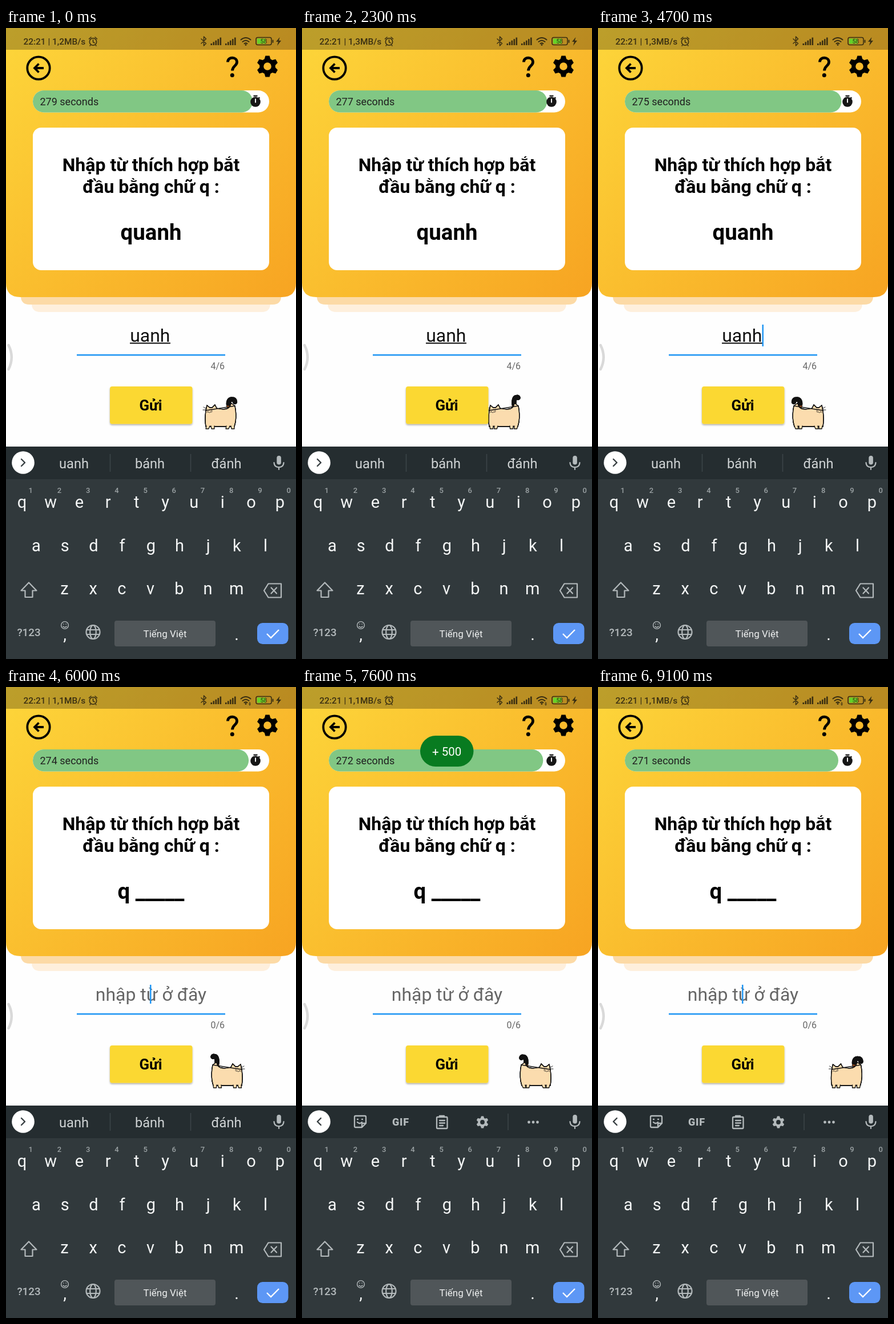
Recreate the animation shown at these times as an HTML page. Size 508x1102 px, loop 9200 ms.

```html
<!DOCTYPE html>
<html lang="vi">
<head>
<meta charset="utf-8">
<style>
html, body { margin: 0; width: 100%; height: 100%; overflow: hidden; background: #fefefe; }
svg { display: block; width: 100%; height: 100%; }
text { font-family: Roboto, "Noto Sans", sans-serif; }
.mid { text-anchor: middle; }
.bold { font-weight: 700; }
.line { fill: none; stroke: currentColor; stroke-linecap: round; stroke-linejoin: round; }
.ink { color: #3a2f12; fill: #3a2f12; }
.pale { color: #b4babc; fill: #b4babc; }
</style>
</head>
<body>
<svg viewBox="0 0 508 1102" preserveAspectRatio="none">
  <defs>
    <linearGradient id="sun" gradientUnits="userSpaceOnUse" x1="0" y1="0" x2="508" y2="470">
      <stop stop-color="#fdd63a"/><stop offset="1" stop-color="#f7a422"/>
    </linearGradient>
    <filter id="soft" x="-10%" y="-10%" width="120%" height="130%">
      <feDropShadow dx="0" dy="2" stdDeviation="1.6" flood-opacity=".32"/>
    </filter>
    <g id="gear">
      <circle r="10.3" fill="none" stroke="currentColor" stroke-width="7"/>
      <path id="tooth" d="M-5.5 -12 L-3.6 -18.6 H3.6 L5.5 -12 Z" fill="currentColor"/>
      <use href="#tooth" transform="rotate(60)"/><use href="#tooth" transform="rotate(120)"/>
      <use href="#tooth" transform="rotate(180)"/><use href="#tooth" transform="rotate(240)"/>
      <use href="#tooth" transform="rotate(300)"/>
    </g>
    <clipPath id="coat"><use href="#body"/></clipPath>
  </defs>

  <rect width="508" height="1102" fill="#fefefe"/>
  <path d="M45 480H463V481Q463 496 448 496H60Q45 496 45 481Z" fill="#feefdc"/>
  <path d="M26 460H482V468Q482 483 467 483H41Q26 483 26 468Z" fill="#fcdaa6"/>
  <path d="M0 0H508V445Q508 470 483 470H25Q0 470 0 445Z" fill="url(#sun)"/>
  <rect width="508" height="38" opacity=".26"/>

  <!-- status bar -->
  <g class="ink">
    <text id="speed" x="30.5" y="29" font-size="15.4" font-weight="500"></text>
    <g class="line" stroke-width="1.6">
      <circle cx="152.500" cy="24" r="6.200"/><path d="M152.500 20.500V24.500L155 26M145.500 19L149 16M159.500 19L156 16M148 30L147 31M157 30L158 31"/>
      <path d="M342 19L350.500 27L346.500 31V15L350.500 19L342 27" stroke-width="1.5"/>
      <path d="M411.500 20.500Q420 13.500 428.500 20.500M414.500 24Q420 19.500 425.500 24M417.500 27.300Q420 25.400 422.500 27.300" stroke-width="2"/>
      <rect x="438" y="16.500" width="27" height="13" rx="3"/>
      <path d="M467.500 21.500V25" stroke-width="2"/>
    </g>
    <circle cx="420" cy="29.500" r="1.400"/>
    <path id="traffic" d="M425 29L427 26.500L429 29ZM425 30H429L427 32.500Z"/>
    <g id="bars"></g>
    <rect x="440" y="18.500" width="15" height="9" fill="#66d228"/>
    <text x="451.500" y="27" font-size="10.500" class="mid">58</text>
    <path d="M479.500 16L473 24H476.800L475 31L482 22H478Z"/>
  </g>

  <!-- header icons -->
  <g color="#000">
    <circle cx="57" cy="70" r="19.700" class="line" stroke-width="3.800"/>
    <path d="M66 70H51M57.500 62.500L50 70L57.500 77.500" class="line" stroke-width="3.800" style="stroke-linecap:butt;stroke-linejoin:miter"/>
    <path d="M388.500 59.500C388.500 49.500 404.500 50 404.500 59.500C404.500 66 396.500 66.500 396.500 74.500" class="line" stroke-width="4.800" style="stroke-linecap:butt"/>
    <circle cx="396.300" cy="82.500" r="3.500"/>
    <use href="#gear" x="458" y="67"/>
  </g>

  <!-- timer -->
  <rect x="47" y="109" width="414" height="38.500" rx="19.200" fill="#fff"/>
  <rect id="bar" x="47" y="109" height="38.500" rx="19.200" fill="#81c784"/>
  <text id="left" x="59.500" y="135" font-size="18" fill="#202020"></text>
  <g fill="#161616">
    <circle cx="437" cy="129" r="8.800"/><rect x="433.500" y="117.500" width="7" height="2.200"/>
    <path d="M442.500 121L444.500 123" stroke="#161616" stroke-width="2"/>
    <rect x="436.100" y="123.500" width="1.900" height="7" fill="#fff"/>
  </g>

  <!-- question card -->
  <rect x="47" y="174" width="414" height="249" rx="14.500" fill="#fff"/>
  <g class="mid bold">
    <text x="254" y="250" font-size="32">Nhập từ thích hợp bắt</text>
    <text x="254" y="287.500" font-size="32">đầu bằng chữ q :</text>
    <text id="word" x="254" y="370" font-size="38.400"></text>
  </g>

  <g id="toast">
    <rect x="207" y="85" width="93.500" height="54" rx="27" fill="#087b20"/>
    <text x="253.700" y="120" font-size="20.500" fill="#fff" class="mid">+ 500</text>
  </g>

  <!-- answer field -->
  <path d="M4.500 554Q15 575 4.500 596" class="line" color="#d9d9d9" stroke-width="4.500"/>
  <text id="field" x="254" y="548" font-size="32" class="mid"></text>
  <rect id="under" x="217" y="549.500" width="71" height="1.900"/>
  <rect id="caret" width="2.500" fill="#2196f3"/>
  <rect x="124" y="569.800" width="260" height="2.600" fill="#2196f3"/>
  <text id="count" x="383" y="596" font-size="16" text-anchor="end" fill="#666"></text>

  <!-- cat -->
  <g id="cat" stroke="#111" stroke-width="1.300" stroke-linejoin="round" stroke-linecap="round">
    <g fill="none">
      <path class="tail" stroke-width="8.500"/>
      <path class="tail" stroke="#f4711f" stroke-width="6.300"/>
      <path class="tail" stroke-width="8.500" pathLength="100" stroke-dasharray="0 52 60"/>
    </g>
    <path id="body" d="M2 28L4 19L9 23H13L18 18L21 24Q31 27 39 25Q45 23 46 15L53 20Q56 35 54 48L52 56H2Q0 44 2 28Z" fill="#fbdcae"/>
    <g clip-path="url(#coat)" stroke="none">
      <path d="M8 20L18 16L24 24L46 14L58 18L56 38Q49 34 47 43Q41 47 36 39Q29 43 25 33Q15 32 8 20Z" fill="#f98a1b"/>
      <path d="M43 15H58V36Q49 35 43 15Z" fill="#ef6a22"/>
      <path d="M12 24L18 15L23 25Q20 28 12 24ZM26 23H36Q34 31 29 29ZM37 35Q42 30 44 37Q41 42 37 35Z" fill="#17110e"/>
    </g>
    <use href="#body" style="fill:none"/>
    <path d="M2 28L4 19L9 23H13L18 18L21 24Q31 27 39 25Q45 23 46 15M53 20Q56 35 54 48L52 56H2Q0 44 2 28Z" fill="none"/>
    <g id="legs" fill="#fbdcae"></g>
    <path d="M-2 22L3 25M-3 27H3M9 26L13 28M9 31L13 30M5 27L6 28M4 31L6 30L8 32" fill="none" stroke-width=".9"/>
  </g>

  <rect x="182" y="626" width="144.500" height="65.500" rx="4" fill="#fbd831" filter="url(#soft)"/>
  <text x="253.500" y="668" font-size="25.800" class="mid bold">Gửi</text>

  <!-- keyboard -->
  <rect y="731" width="508" height="371" fill="#31393c"/>
  <rect y="731" width="508" height="57" fill="#252d30"/>
  <circle cx="30" cy="759" r="19.800" fill="#fff"/>
  <path id="arrow" class="line" color="#3b4245" stroke-width="2.400"/>
  <g id="hints" fill="#d0d4d5" font-size="23.600" class="mid">
    <text x="119" y="769">uanh</text><text x="252" y="769">bánh</text><text x="386" y="769">đánh</text>
    <path d="M182.500 744V775M323.500 744V775" stroke="#3d4649" stroke-width="1.500"/>
  </g>
  <g id="tools" class="pale">
    <g class="line" stroke-width="2.300">
      <path d="M94 749H110Q112 749 112 751V762L105 769H94Q92 769 92 767V751Q92 749 94 749M112 762H105V769"/>
      <path d="M97 755H98M105 755H106M97 760Q101 764 105 760"/>
      <rect x="236" y="751" width="18.500" height="20" rx="1.500"/><path d="M241 751V749H249V751M241 757H250M241 761.500H250M241 766H247"/>
    </g>
    <text x="173" y="766" font-size="18" class="mid" font-weight="900" letter-spacing=".8">GIF</text>
    <use href="#gear" transform="translate(316 760) scale(.57)"/>
    <path d="M361 745V774" stroke="#3d4649" stroke-width="1.500"/>
    <circle cx="397.500" cy="760" r="2.400"/><circle cx="405" cy="760" r="2.400"/><circle cx="412.500" cy="760" r="2.400"/>
  </g>
  <g class="pale">
    <rect x="474.300" y="747" width="7.600" height="15.500" rx="3.800"/>
    <path d="M469.500 759Q470 767 478 767T486.500 759M478 767V771" class="line" stroke-width="2.200"/>
  </g>
  <g id="keys" fill="#f4f6f6" class="mid"></g>
  <g class="pale">
    <g class="line" stroke-width="2.200">
      <path d="M40 968.500L53.500 982.500H46.500V994H33.500V982.500H26.500Z"/>
      <path d="M459.500 970.500H482V994.500H459.500L452 982.500ZM464.500 977.500L474 987.500M474 977.500L464.500 987.500"/>
      <circle cx="152.500" cy="1055" r="12"/><ellipse cx="152.500" cy="1055" rx="5.300" ry="12"/>
      <path d="M141.500 1051H163.500M141.500 1059H163.500"/>
      <circle cx="103" cy="1043" r="6.400" stroke-width="1.400"/>
      <path d="M100 1045Q103 1048.500 106 1045M100.700 1041H101M105 1041H105.300" stroke-width="1.500"/>
    </g>
    <text x="40" y="1062" font-size="18.800" class="mid" font-weight="500">?123</text>
  </g>
  <rect x="190" y="1035" width="177" height="45" rx="4" fill="#505659"/>
  <text x="278.500" y="1063.500" font-size="17" fill="#eef0f0" class="mid">Tiếng Việt</text>
  <rect x="440" y="1039" width="54.500" height="37" rx="9.500" fill="#5d97f5"/>
  <path d="M457 1058L464 1065L478 1051" class="line" color="#fff" stroke-width="2.400" style="stroke-linecap:butt;stroke-linejoin:miter"/>
</svg>

<script>
const LOOP = 9200, STEP = 100, HOLD = 500;
const CLEARED = 5800, TOOLS = 6300, TURN_RIGHT = 2900, TURN_LEFT = 8900;
const $ = id => document.getElementById(id);
const show = (id, on) => { $(id).style.display = on ? '' : 'none'; };
const mix = (a, b, k) => a + (b - a) * k;

function add(parent, tag, attrs, text = '') {
  const el = document.createElementNS('http://www.w3.org/2000/svg', tag);
  for (const name in attrs) el.setAttribute(name, attrs[name]);
  el.textContent = text;
  $(parent).append(el);
  return el;
}

function keyRow(letters, x, y) {
  [...letters].forEach((c, i) => add('keys', 'text', { x: x + i * 50.2, y, 'font-size': 29 }, c));
}
keyRow('qwertyuiop', 28, 838);
keyRow('asdfghjkl', 53, 914);
keyRow('zxcvbnm', 102.5, 989);
keyRow(',', 103, 1069);
keyRow('.', 404, 1069);
[...'1234567890'].forEach((c, i) =>
  add('keys', 'text', { x: 43.3 + i * 50.2, y: 812, 'font-size': 13, 'font-weight': 500, fill: '#9ba2a4' }, c));

for (const x of [358.5, 384])
  for (let i = 0; i < 5; i++) {
    const h = 3 + i * 2.6;
    add('bars', 'rect', { x: x + i * 4, y: 30 - h, width: 2.6, height: h });
  }

const legs = [3, 11, 38, 46].map(x => ({ x, el: add('legs', 'path', {}) }));
const tails = document.querySelectorAll('.tail');
// control points of the curled and the raised tail
const curled = [50, 34, 40, 25, 38, 8, 48, 9, 53, 9, 53, 14];
const raised = [50, 34, 45, 24, 43, 5, 50, 5, 52, 4, 52.5, 5.5];

// [time, left edge] pairs for each leg of the walk
const walks = [
  [[400, 348], [2300, 326], [TURN_RIGHT, 317]],
  [[TURN_RIGHT, 306], [3700, 319.5], [4700, 340], [6000, 359], [7600, 381], [TURN_LEFT, 400]],
  [[TURN_LEFT, 411], [9100, 407.5]]
];

function along(points, t) {
  if (t <= points[0][0]) return points[0][1];
  for (let i = 1; i < points.length; i++) {
    const [t0, a] = points[i - 1], [t1, b] = points[i];
    if (t <= t1) return mix(a, b, (t - t0) / (t1 - t0));
  }
  return points[points.length - 1][1];
}

function drawCat(t) {
  const stage = t < TURN_RIGHT ? 0 : t < TURN_LEFT ? 1 : 2;
  const x = along(walks[stage], t);
  $('cat').setAttribute('transform', stage === 1 ? `translate(${x + 56} 640) scale(-1 1)` : `translate(${x} 640)`);

  const phase = (t - 100) / 900 * 2 * Math.PI;
  const p = curled.map((v, i) => mix(v, raised[i], (1 - Math.cos(phase)) / 2));
  const d = `M${p.slice(0, 2)}C${p.slice(2, 8)}Q${p.slice(8)}`;
  tails.forEach(el => el.setAttribute('d', d));

  legs.forEach(({ x, el }, i) => {
    const swing = Math.sin(phase + i * Math.PI) * 1.5;
    el.setAttribute('d', `M${x} 55L${x + swing} 60H${x + 5 + swing}L${x + 6} 55`);
  });
}

function draw(time) {
  const t = time < HOLD ? 0 : Math.floor(time / STEP) * STEP;
  const done = t >= CLEARED;

  const secs = t < 1200 ? 279 : 278 - Math.floor((t - 1200) / 1000);
  $('left').textContent = secs + ' seconds';
  $('bar').setAttribute('width', 414 * secs / 300);

  $('speed').textContent = `22:21 | 1,${t < 1500 ? 2 : t < 5500 ? 3 : 1}MB/s`;
  show('traffic', t >= 5500);

  $('word').textContent = done ? 'q _____' : 'quanh';
  $('field').textContent = done ? 'nhập từ ở đây' : 'uanh';
  $('field').setAttribute('x', done ? 254 : 252.3);
  $('field').setAttribute('fill', done ? '#666' : '#111');
  $('count').textContent = done ? '0/6' : '4/6';
  show('under', !done);

  const caret = $('caret');
  show('caret', done ? (t - CLEARED) % 1000 < 500 : t % 1000 >= 500);
  caret.setAttribute('x', done ? 252 : 287.5);
  caret.setAttribute('y', done ? 520 : 518);
  caret.setAttribute('height', done ? 33 : 38);

  const fade = Math.min(t - 6100, 8400 - t) / 200;
  $('toast').setAttribute('opacity', Math.max(0, Math.min(1, fade)));

  const tools = t >= TOOLS;
  show('tools', tools);
  show('hints', !tools);
  $('arrow').setAttribute('d', tools ? 'M33 753L27 759L33 765' : 'M27 753L33 759L27 765');

  drawCat(t);
}

function tick() {
  draw(performance.now() % LOOP);
  requestAnimationFrame(tick);
}
tick();
</script>
</body>
</html>
```
